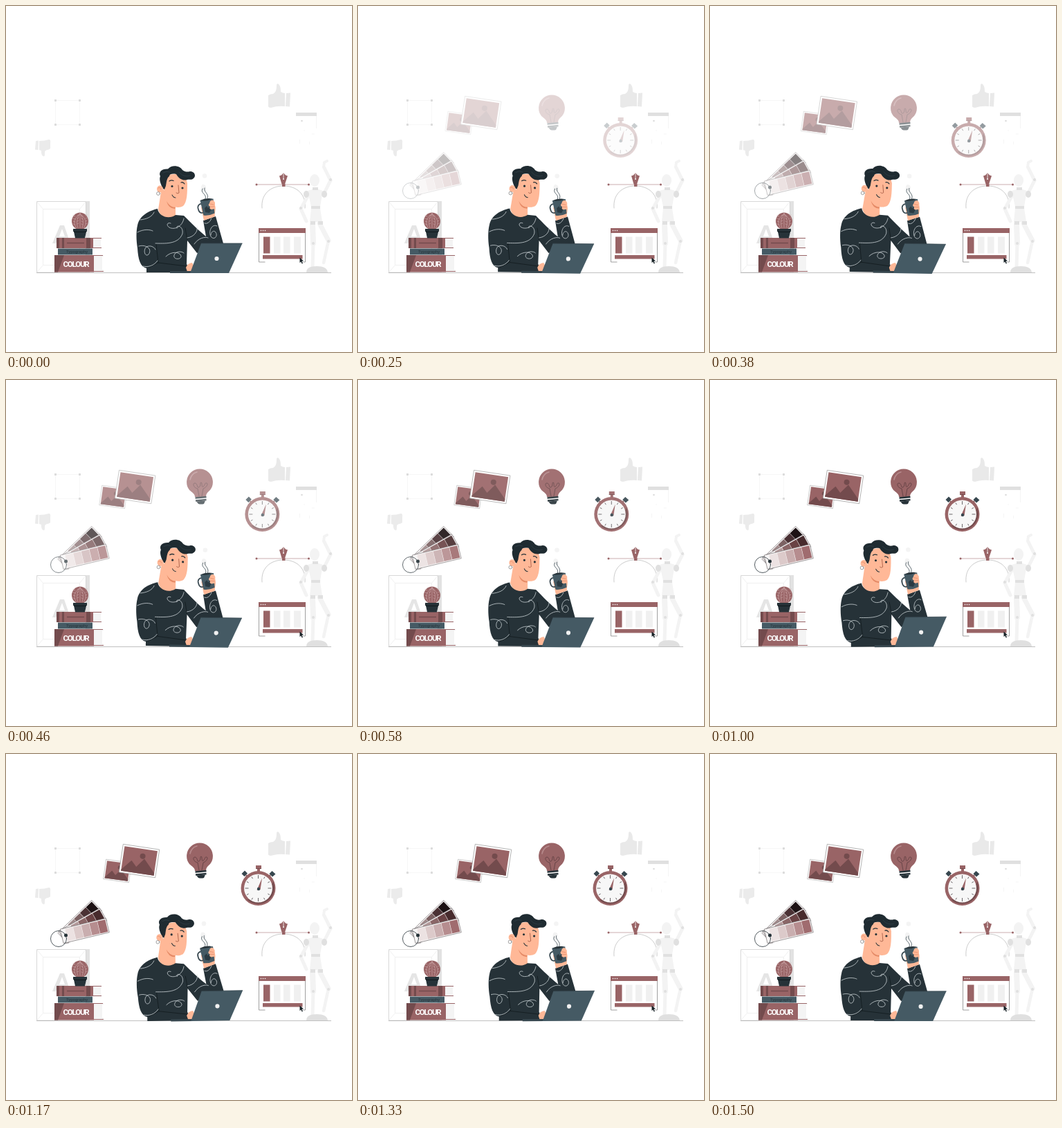
An HTML page that plays this animation: 500 by 500 pixels, repeating every 1.54 s.

```html
<!DOCTYPE html>
<html>
<head>
<meta charset="utf-8">
<style>
  html, body { margin: 0; width: 100%; height: 100%; overflow: hidden; background: #fff }
  svg { display: block; width: 100vw; height: 100vh; --red: #996466; --shade: #734b4d; --navy: #263238; --teal: #455a64; --skin: #ffb897 }
  .line { fill: none; stroke-linecap: round; stroke-linejoin: round }
  .limb { fill: none; stroke: #f3f3f3; stroke-linecap: round }
  text { font-family: Roboto, "Open Sans", sans-serif }
</style>
</head>
<body>
<svg viewBox="0 0 500 500">
  <!-- selection box and thumbs -->
  <rect x="71.5" y="136.5" width="35" height="35" fill="none" stroke="#f4f4f4" stroke-width=".7"/>
  <path d="M70 135h3v3h-3zM105 135h3v3h-3zM70 170h3v3h-3zM105 170h3v3h-3z" fill="#dcdcdc"/>
  <g fill="#e9e9e9">
    <path d="M379 129q3-2 7-2c4-2 5-7 5-12q0-4 3-2c3 3 3 8 3 11q3 2 6 2v19q-11-1-20 2-5 0-4-4z"/>
    <path d="M405 126l6-.5-1 20-6-.5z"/>
  </g>
  <g fill="#ebebeb">
    <path d="M64 206q-2 2-5 2c-3 1-3 3-3 6q0 4-2 3c-3-1-3-5-3-8l-3-1v-13q8 0 14-2 3 0 2 5z"/>
    <path d="M43 195l4-.5-.5 13.500-4.500-.5z"/>
  </g>

  <!-- faint window -->
  <path d="M419 154h30v5h-30z" fill="#e0e0e0"/>
  <path d="M448.500 159v18M424.500 193v6M438.500 196v4M430 180h2M442 185h4" stroke="#f5f5f5" fill="none"/>
  <circle cx="427.500" cy="166" r="1.300" fill="#dcdcdc"/>

  <!-- picture frame -->
  <g fill="none" stroke="#dadada" stroke-width=".8">
    <path d="M115 282h6v103h-6z" fill="#e2e2e2" stroke="none"/>
    <path d="M44.500 282.500h71v102.500h-71z" fill="#fff" stroke="#cfcfcf"/>
    <path d="M53.500 293.500h53v81h-53zM44.500 282.500l9 11M115.500 282.500l-9 11M44.500 385l9-10.500" stroke="#ececec"/>
  </g>
  <path d="M67 343l11-26h6l9 26h-5l-2-6h-11l-3 6zM77 333h8l-4-11z" fill="#e5e5e5" fill-rule="evenodd"/>

  <!-- books and cactus -->
  <g>
    <path d="M124 335h14v2h-1v11h1v2h-14zM124 360h17v2h-2v19h2v3h-17z" fill="#f4f4f4"/>
    <path d="M124 335.500h14M124 349.500h14M125 360.500h15M125 383.500h16" stroke="#996466" fill="none"/>
    <path d="M73 335h53v15H73zM70 360h57v24.500H70z" fill="var(--red)"/>
    <path d="M73 335h4v15h-4zM81 335h3v15h-3zM116 335h6v15h-6z" fill="var(--shade)"/>
    <path d="M70 360h14l-9 24.500h-5z" fill="var(--shade)"/>
    <path d="M88 342.500h25" stroke="#734b4d" stroke-width="1.500"/>
    <path d="M75 350.500h50v9H75z" fill="var(--teal)"/>
    <text x="87" y="357.300" font-size="6" fill="#263238">Typography</text>
    <text x="101" y="377" font-size="11.500" font-weight="700" letter-spacing="-1.200" text-anchor="middle" fill="#fff">COLOUR</text>
    <ellipse cx="107" cy="311" rx="12" ry="12.500" fill="var(--red)"/>
    <path id="spines" class="line" stroke="#c9a3a4" stroke-width=".7"/>
    <path d="M97 322h20v4h-1l-2 9.500h-14l-2-9.500h-1z" fill="var(--navy)"/>
    <path d="M98 326.500h18" stroke="#10191d"/>
  </g>

  <!-- bezier pen -->
  <g class="line" stroke="#b5b5b5" stroke-width=".7">
    <path d="M362 258h75" stroke="#b58b8d"/>
    <path d="M370 292c-2-20 12-32 31-32s33 12 31 32"/>
  </g>
  <path d="M401 241l3 3.500 3 1-4 12h-4.500l-3.500-12 3-1zM399 257h4.500v4H399z" fill="var(--red)"/>
  <path d="M401 241v8" stroke="#fff" stroke-width=".8"/><circle cx="401" cy="250" r="1" fill="#fff"/>
  <circle cx="362" cy="258" r="1.500" fill="var(--red)"/><circle cx="437.500" cy="258" r="1.500" fill="var(--red)"/>

  <!-- mannequin -->
  <g class="limb">
    <path d="M437 273l-11 20 8 18" stroke-width="5"/>
    <path d="M459 272l10-20-9-18" stroke-width="5"/>
    <path d="M459 233l1-7 4-2" stroke-width="4"/>
    <path d="M443 315l1 28" stroke-width="8"/><path d="M444 343l-1 33" stroke-width="5"/>
    <path d="M453 314l13 25" stroke-width="7"/><path d="M466 339l-7 32" stroke-width="4.500"/>
  </g>
  <g fill="#f3f3f3">
    <ellipse cx="446" cy="252" rx="7" ry="9"/>
    <path d="M436 267q11-5 22 0l-4 23h-13zM441 292h13l3 20h-18z"/>
  </g>
  <g fill="#e0e0e0">
    <path d="M443 262h8v4h-8zM441 289h13v4h-13zM440 311h7v5h-7zM451 311h7v5h-7z"/>
    <ellipse cx="434" cy="272" rx="4" ry="5"/><ellipse cx="460" cy="272" rx="4" ry="5"/>
    <circle cx="469" cy="251" r="2"/><circle cx="426" cy="292" r="2"/><circle cx="444" cy="343" r="2"/><circle cx="466" cy="340" r="2"/>
    <path d="M434 385q0-9 15-9t16 9z"/>
  </g>

  <!-- layout window -->
  <path d="M365.500 322h67v48h-67z" fill="#fff"/>
  <path d="M365.500 326v44h9M432.500 326v44h-3" fill="none" stroke="#888" stroke-width=".8"/>
  <path d="M365 321h68v7h-68zM372 333.500h9.500v24H372zM371 360h57.500v5.500H371z" fill="var(--red)"/>
  <path d="M387 333.500h9.500v24H387zM401 333.500h9.500v24H401zM416 333.500h10v24H416z" fill="#f0f0f0"/>
  <path d="M368.500 324.500h0M371.500 324.500h0M374.500 324.500h0" class="line" stroke="#fff" stroke-width="1.600"/>
  <path d="M424.500 363.500l5.500 5-2.500.3 1.500 3-1.300.6-1.400-3-1.800 1.600z" fill="#172126"/>

  <path d="M44 385.500h426" stroke="#b0b0b0" stroke-width=".8"/>

  <!-- swatch fan -->
  <g id="fan">
    <g id="cards"></g>
    <circle cx="76" cy="267" r="11.500" class="line" stroke="#263238" stroke-width=".8"/>
    <circle cx="86.500" cy="262" r="2.500" fill="#263238"/>
  </g>

  <!-- photos -->
  <g id="photos">
    <g transform="translate(161 169) rotate(8) scale(.7)"><use href="#print"/></g>
    <g transform="translate(192.500 154.500) rotate(8.500)">
      <g id="print">
        <path d="M-26.500-20.500h53v41h-53z" fill="#fff" stroke="#9a9a9a" stroke-width=".7"/>
        <path d="M-24-18h48v36h-48z" fill="var(--red)"/>
        <path d="M-24 18v-2l13-15 8 8 10-13 17 18v4z" fill="var(--shade)"/>
        <circle cx="4" cy="-7.500" r="4" fill="var(--shade)"/>
      </g>
    </g>
  </g>

  <!-- bulb -->
  <g id="bulb">
    <path d="M273 169c0-5-4-6-8-10a18.900 18.900 0 1 1 30 0c-4 4-6 5-6 10z" fill="var(--red)"/>
    <path d="M266 144q2-9 10-11" class="line" stroke="#b78b8d" stroke-width="1.500"/>
    <path d="M279 168l-2-11c-6-1-8-8-4-8s3 8 6 6 1-7 3-7 0 8 3 6 2-6 5-5-1 7-5 8l-2 11" class="line" stroke="#55383b" stroke-width=".7"/>
    <path d="M273.500 170.500l16-1.500M274 174.500l15.500-1.500" stroke="#263238" stroke-width="2.500"/>
    <path d="M275 175.500l13-1-2 4.500q-4 1-8 0z" fill="#263238"/>
  </g>

  <!-- stopwatch -->
  <g id="clock">
    <path d="M361 161h8v5h-2v5h-4v-5h-2z" fill="var(--red)"/>
    <path d="M361 165.500h8" stroke="#734b4d"/>
    <path d="M340.500 173l4.500-4.500 4 4-4.500 4.500zM380.500 173l4-4 5 4.500-4.500 4z" fill="#37474f"/>
    <path d="M347 175l4 4M382 175l-4 4" stroke="#734b4d" stroke-width="2"/>
    <circle cx="364.500" cy="194" r="25" fill="var(--red)"/>
    <path d="M386 184a23.500 23.500 0 0 1-38 26q30 5 38-26z" fill="var(--shade)"/>
    <circle cx="364.500" cy="194" r="20.500" fill="#f7f7f7"/>
    <path id="ticks" stroke="#5b5559" stroke-width=".9"/>
    <path d="M362.500 196.500L370 179.500 367.500 196z" fill="var(--red)"/>
    <circle cx="365" cy="195" r="2.200" fill="#37474f"/>
  </g>

  <!-- man -->
  <g id="man">
    <circle cx="287" cy="245.500" r="3.300" fill="#f4f4f4"/>
    <path d="M282 263q0-6 4-5t3 8q-3 5-7-3" fill="#f3f3f3"/>
    <path d="M284 264c-4 7 7 7 4 15M287 263c-2 6 7 8 4 15" class="line" stroke="#37474f" stroke-width=".8"/>

    <path d="M225 262l-5 32q4 13 15 13 9-1 10-5v-14z" fill="var(--skin)"/>
    <path d="M229 244c-3 10-1 26 3 36 6 11 17 13 24 9 6-6 6-19 6-33l-4-14z" fill="var(--skin)"/>
    <path d="M232 282q5 9 13 9l-1 2q-9 0-12-11z" fill="#e58a66"/>
    <path d="M227 264C223 257 221 250 223 246C220 240 225 235 234 235.500C239 229 251 230 255 237C259 240 262 240 266 239C273 239 275 246 271 249C268 252 265 250 262 251C256 253 250 250 246 243C240 242 236 243 236 246C232 249 232 255 231 260L229 265Z" fill="#1f2b31"/>
    <path d="M227 241q5-3 10-1M250 240c5 6 11 7 16 5" class="line" stroke="#37474f" stroke-width=".6"/>
    <ellipse cx="222.500" cy="264.500" rx="4.500" ry="5" fill="var(--skin)"/>
    <path d="M220 263q3-2 4 2" class="line" stroke="#e58a66" stroke-width=".8"/>
    <circle cx="220" cy="271" r="2.400" class="line" stroke="#777" stroke-width=".7"/>
    <g class="line" stroke="#263238">
      <path d="M236 253q3-2 6-.5M253 255q3-1 5 2" stroke-width="1.300"/>
      <path d="M249 259l1 11q-2 2-4 0" stroke="#a85f48" stroke-width=".9"/>
      <path d="M240 273q2 4 5 4" stroke-width="1"/>
    </g>
    <circle cx="240" cy="260.500" r="1.600" fill="#263238"/><circle cx="255" cy="263" r="1.600" fill="#263238"/>

    <path d="M219 293C221 304 235 309 245 302L257 303C267 313 279 325 289 333L285 310L303 304L314 343L276 357L262 339L261 373L268 385H203V379C194 377 191 366 190 350C188 338 188 325 190 317C193 303 206 296 219 293Z" fill="var(--navy)"/>
    <path d="M217 344l3 27 41 5M262 338l-3-17M220 371l-14 7" class="line" stroke="#141d21" stroke-width=".9"/>
    <g class="line" stroke="#d5dcdf" stroke-width=".75">
      <path d="M194 309c9-1 17-4 20-11M190 327c9-5 18-4 22-2M192 347c10-3 20 4 14 12-5 4-8-5-4-10 4-4 12-2 14 3M198 376c8 2 16-1 21-8"/>
      <path d="M216 343c13 0 33 2 39-14 2-11-10-14-8-8M257 307c-2 12-14 17-21 13-5-3-3-8 2-6M231 362c8-8 20-7 22-1 1 6-12 6-10-1 2-6 11-6 14-3"/>
      <path d="M262 335c9-1 16-9 14-16M272 344c6-9 16-11 20-9M305 318c-7-4-13 7-9 15 4 6 11 0 7-6-3-4-7 0-7 4M287 314q6 2 10-7"/>
    </g>

    <path d="M282 291l4 19 16-6c-1-5 2-10 0-16l-3-8z" fill="var(--skin)"/>
    <path d="M284 286c-5-1-8 3-6 8 1 5 5 6 8 4" class="line" stroke="#37474f" stroke-width="1.700"/>
    <path d="M280.500 281l19-2.500 2 21q-8 4-16 3z" fill="var(--teal)"/>
    <path d="M280.500 281q8-4 18-2.500-8 4-18 2.500z" fill="#263238"/>
    <path d="M287 292l3-3 2 3 3-3 1 6-2 4-6-1z" fill="#2b3a42"/>
    <path d="M295 282q4-4 7 2v9l-5 1q-4-1-2-4-4-2-1-5z" fill="var(--skin)"/>
    <path d="M295 286l5 1M296 290l5 0" class="line" stroke="#d97e5c" stroke-width=".6"/>

    <path d="M260 378q2-6 9-7l3 6-2 7h-8z" fill="var(--skin)"/>
    <path d="M237 383h32v3h-32z" fill="#37474f"/>
    <path d="M282 343h59.500L322 386h-56z" fill="var(--teal)"/>
    <path d="M282 343h59.500" stroke="#37474f" stroke-width=".8"/>
    <circle cx="304.500" cy="365" r="3.100" fill="#f1f1f1"/>
  </g>
</svg>
<script>
const LOOP = 1540, ENTER = 1000, LEAD = 20, SLIDE = 20;
const $ = id => document.getElementById(id);

// Stopwatch ticks
$("ticks").setAttribute("d", Array.from({ length: 12 }, (_, i) => {
  const a = i * Math.PI / 6, x = Math.sin(a), y = Math.cos(a), r = i % 3 ? 16 : 14;
  return `M${364.5 + x * r} ${194 + y * r}L${364.5 + x * 19} ${194 + y * 19}`;
}).join(""));

// Cactus ribs
$("spines").setAttribute("d", [-9, -5, 0, 5, 9].map(x =>
  `M107 300q${x * 1.5} 10 ${x * .6} 21`).join("") +
  [303, 307, 311, 315].map(y => `M97 ${y}l3 1M103 ${y}l2-1M109 ${y}l2 1M115 ${y}l2-1`).join(""));

// Swatch cards, back to front
$("cards").innerHTML = [
  [-44, ["#a08a8b", "#7c6263", "#4a3134", "#1d1214"]],
  [-29, ["#b39a9b", "#8a6667", "#6a4345", "#472b2d"]],
  [-13.5, ["#ece2e2", "#dccaca", "#c9aeaf", "#b68d8f", "#a06c6f"]]
].map(([angle, colors]) => {
  const step = 12, start = 61 - step * colors.length;
  return `<g transform="translate(86.5 262) rotate(${angle})">
    <path d="M-6-10.500h68v21h-68z" fill="#f8f6f6" stroke="#6b6466" stroke-width=".6"/>` +
    colors.map((c, i) => `<path d="M${start + i * step}-9h11.500v18h-11.500z" fill="${c}"/>`).join("") + "</g>";
}).join("");

// cubic-bezier(.36, -.01, .5, 1.38)
function ease(p) {
  if (p >= 1) return 1;
  const curve = (s, a, b) => 3 * a * s * (1 - s) ** 2 + 3 * b * s * s * (1 - s) + s ** 3;
  let lo = 0, hi = 1;
  for (let i = 0; i < 24; i++) {
    const mid = (lo + hi) / 2;
    if (curve(mid, .36, .5) < p) lo = mid; else hi = mid;
  }
  return curve(lo, -.01, 1.38);
}

function enter(id, k, from) {
  $(id).setAttribute("opacity", Math.min(1, Math.max(0, k)));
  $(id).setAttribute("transform", `translate(${from * (1 - k)} 0)`);
}

function draw(now) {
  const t = now % LOOP, k = t < 40 ? 0 : ease((t + LEAD) / ENTER), u = t / LOOP;
  enter("photos", k, -SLIDE);
  enter("clock", k, SLIDE);
  enter("fan", k, 0);
  enter("bulb", k, 0);
  const sway = u < .25 ? u * 4 : u < .75 ? 2 - u * 4 : u * 4 - 4;
  $("man").setAttribute("transform", `rotate(${sway} 265 308)`);
}

const begin = performance.now();
function frame() {
  draw(performance.now() - begin);
  requestAnimationFrame(frame);
}
draw(0);
requestAnimationFrame(frame);
</script>
</body>
</html>
```
